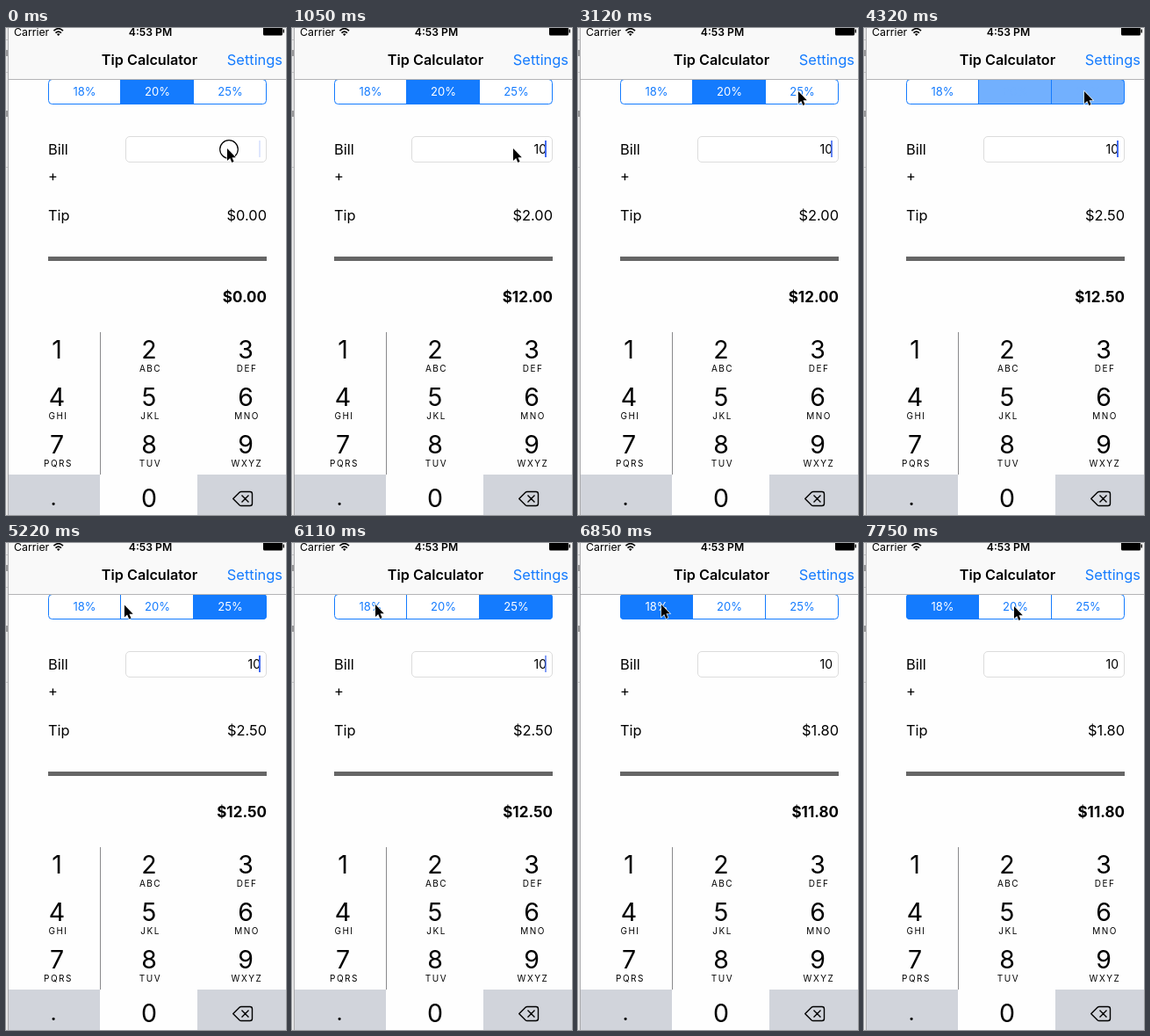
An HTML page for the animation above (8000 ms loop, 319 by 554 pixels).

```html
<!DOCTYPE html>
<html lang="en">
<head>
<meta charset="utf-8">
<title>Tip Calculator</title>
<style>
html, body { margin: 0; width: 100%; height: 100%; overflow: hidden; background: #fefefe; }
svg { display: block; width: 100vw; height: 100vh; font: 400 16.4px Inter, Roboto, sans-serif; }
.mid { text-anchor: middle; }
.end { text-anchor: end; }
.key { font-size: 28.5px; }
.abc { font-size: 10px; letter-spacing: 1.5px; }
</style>
</head>
<body>
<svg viewBox="0 0 319 554">
  <rect width="319" height="554" fill="#fefefe"/>
  <rect width="319" height="58" fill="#f9f9f9"/>

  <!-- window edge -->
  <rect width="2" height="554" fill="#e9e9ea"/>
  <path d="M2.5 0V554" stroke="#a9a9ab"/>
  <path d="M0 13.5H2M0 50.5H2M0 158.5H2" stroke="#c4c4c6"/>
  <path d="M1 25V32M1 94V101" stroke="#99999b" stroke-width="2"/>

  <!-- status bar -->
  <text x="9" y="9" font-size="12.3">Carrier</text>
  <path d="M54.4 3.2Q59.7 -1.8 65 3.2M56.5 5.6Q59.7 2.6 62.9 5.6" fill="none" stroke="#000" stroke-width="1.7"/>
  <path d="M57.9 7.1Q59.7 5.5 61.5 7.1L59.7 9Z"/>
  <text class="mid" x="164.5" y="9" font-size="12.2" font-weight="600">4:53 PM</text>
  <rect x="293" y="-2" width="22" height="10.5" rx="1.5"/>
  <path d="M316.3 1.5V5.5" stroke="#000" stroke-width="1.4"/>

  <text class="mid" x="163.5" y="42" font-size="16.2" font-weight="600">Tip Calculator</text>
  <text class="end" x="315" y="42" fill="#147bfe">Settings</text>

  <!-- segments, tucked under the bar's hairline -->
  <clipPath id="round"><rect x="48" y="58" width="249" height="29" rx="4"/></clipPath>
  <g id="segs" clip-path="url(#round)" font-size="13"></g>
  <path d="M130.5 58V87M213.5 58V87" stroke="#147bfe"/>
  <rect x="48.5" y="58.5" width="248" height="28" rx="4" fill="none" stroke="#147bfe"/>
  <path d="M3 58.5H319" stroke="#b4b4b6"/>

  <!-- form -->
  <text x="48" y="144">Bill</text>
  <text x="48" y="174">+</text>
  <text x="48" y="219">Tip</text>
  <rect x="136.5" y="123.5" width="160" height="29" rx="4.5" fill="#fff" stroke="#dcdcdc"/>
  <text id="bill" class="end" x="290" y="143" font-size="14"></text>
  <rect id="caret" x="288" y="128" width="2" height="19" fill="#426bf2"/>
  <text id="tip" class="end" x="297" y="219"></text>
  <rect x="48" y="260" width="249" height="5" fill="#666"/>
  <text id="total" class="end" x="297" y="312" font-size="17" font-weight="700"></text>

  <!-- keypad -->
  <path d="M3 508H107V554H3ZM218 508H319V554H218Z" fill="#d1d4db"/>
  <path d="M107.5 346V508" stroke="#8a8a8c"/>
  <g id="keys"></g>
  <path d="M258.7 535.5L266 528.2Q266.8 527.5 268 527.5H278Q280.5 527.5 280.5 530V541Q280.5 543.5 278 543.5H268Q266.8 543.5 266 542.8ZM268.5 531.5L276.5 539.5M276.5 531.5L268.5 539.5"
    fill="none" stroke="#000" stroke-width="1.4" stroke-linejoin="round"/>

  <circle id="ring" cx="254" cy="138" r="10.3" fill="none" stroke="#000" stroke-width="1.2"/>
  <path id="pointer" d="M0 0V14L3.2 11 5.3 16 7.6 15 5.5 10.2H9.8Z" stroke="#fff" stroke-width="1.2" paint-order="stroke"/>
</svg>
<script>
const $ = id => document.getElementById(id);
const LOOP = 8000, STEP = 148.5; // the screen refreshes once per STEP ms
const percents = [18, 20, 25];

$('keys').innerHTML = ['1', '2ABC', '3DEF', '4GHI', '5JKL', '6MNO', '7PQRS', '8TUV', '9WXYZ', '.', '0'].map((k, i) => {
  const x = [58, 163, 273][i % 3], row = Math.floor(i / 3), y = 376 + 54 * row + (row > 2 ? 7 : 0);
  return k === '.' ? `<text class="mid" x="54" y="543" font-size="25">.</text>`
    : `<text class="mid key" x="${x}" y="${y}">${k[0]}</text>
       <text class="mid abc" x="${x + 1.5}" y="${y + 15}">${k.slice(1)}</text>`;
}).join('');

$('segs').innerHTML = percents.map((p, i) =>
  `<rect x="${48 + 83 * i}" y="58" width="83" height="29"/>
   <text class="mid" x="${89.5 + 83 * i}" y="77">${p}%</text>`).join('');
const boxes = $('segs').querySelectorAll('rect'), labels = $('segs').querySelectorAll('text');

// The script of the session, timed in steps
const strokes = [1, 7];                                  // digits "1", "0"
const taps = [{ at: 28, seg: 2 }, { at: 44, seg: 0 }];
const moves = [
  { from: 12, to: 14, x: 224, y: 126 },
  { from: 14, to: 18, x: 251, y: 72 },
  { from: 32.7, to: 39, x: 95, y: 70 },
  { from: 46.2, to: 52, x: 171, y: 72 },
];

const clamp = v => Math.min(1, Math.max(0, v));
const easeOut = u => 1 - (1 - u) ** 3;
const tint = a => `rgb(${[20, 123, 254].map(c => Math.round(255 + (c - 255) * a))})`;
const ink = a => Math.abs(a - .5) < .2 ? a : 1 - a;      // label melts into its box halfway
const money = n => '$' + n.toFixed(2);

function pointerAt(n) {
  let x = 252, y = 137;
  for (const m of moves) {
    const e = easeOut(clamp((n - m.from) / (m.to - m.from)));
    x += (m.x - x) * e;
    y += (m.y - y) * e;
  }
  return [x, y];
}

// Blinks once a second, but stays lit while digits are typed
function caretAt(n) {
  if (strokes.some(s => n >= s && n < s + 4)) return 1;
  return clamp(.5 + .9 * Math.cos(2 * Math.PI * (n * STEP - 310) / 1000));
}

function fillsAt(n) {
  const fills = [0, 1, 0];
  let sel = 1;
  for (const { at, seg } of taps.filter(t => n >= t.at)) {
    const k = n - at;
    fills[sel] = clamp(1 - .4 * k * k);
    fills[seg] = clamp(.17 + .43 * k);
    sel = seg;
  }
  return { fills, sel };
}

function draw(ms) {
  const n = Math.floor(ms % LOOP / STEP);
  const bill = +'10'.slice(0, strokes.filter(s => n >= s).length);
  const { fills, sel } = fillsAt(n);
  const tip = bill * percents[sel] / 100;
  $('bill').textContent = bill || '';
  $('tip').textContent = money(tip);
  $('total').textContent = money(bill + tip);
  $('caret').setAttribute('opacity', caretAt(n));
  $('pointer').setAttribute('transform', `translate(${pointerAt(n)})`);
  $('ring').setAttribute('opacity', n ? 0 : 1);
  fills.forEach((a, i) => {
    boxes[i].setAttribute('fill', tint(a));
    labels[i].setAttribute('fill', tint(ink(a)));
  });
}

let start;
function tick(now) {
  start ??= now;
  draw(now - start);
  requestAnimationFrame(tick);
}
draw(0);
requestAnimationFrame(tick);
</script>
</body>
</html>
```
